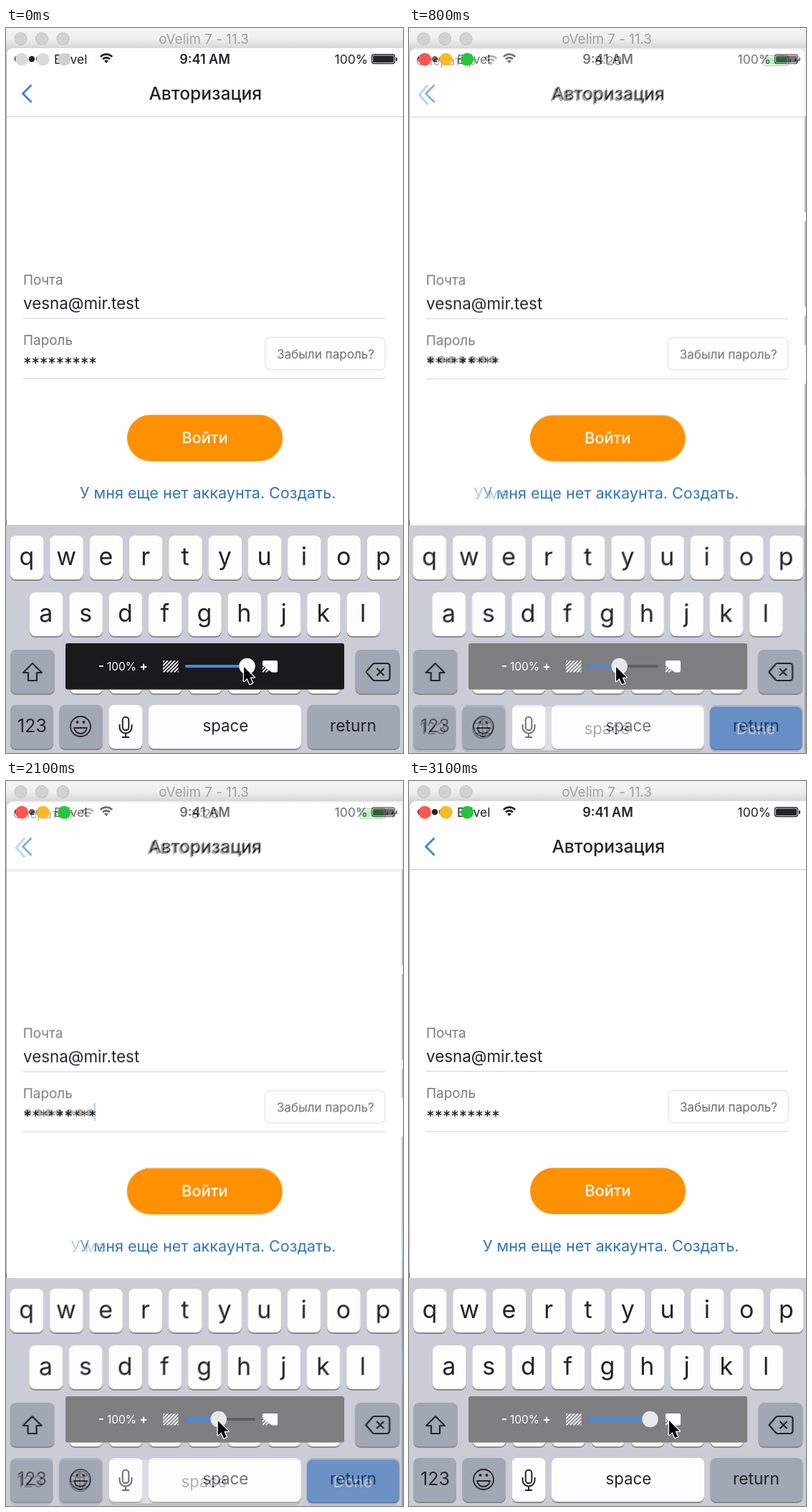
An HTML page with a canvas that plays this animation: 554 by 1011 pixels, repeating every 3200 ms.

```html
<!DOCTYPE html>
<html lang="ru">
<head>
<meta charset="utf-8">
<style>
html, body { margin: 0; width: 100%; height: 100%; overflow: hidden; background: #fff; }
canvas { display: block; width: 554px; height: 1011px; }
</style>
</head>
<body>
<canvas id="stage" width="554" height="1011"></canvas>
<script>
const W = 554, H = 1011, LOOP = 3200, STEP = 100;
const INK = '#232427', KEY = '#fdfdfe', GRAY_KEY = '#a1a7b3', ROW_PITCH = 55.3;
const stage = document.getElementById('stage').getContext('2d');
let g = stage;

function text(str, x, y, size, color = INK, weight = 400, align = 'left') {
  g.font = `${weight} ${size}px Inter, sans-serif`;
  g.textAlign = align;
  g.fillStyle = color;
  g.fillText(str, x, y);
}
function box(x, y, w, h, r, fill, stroke) {
  g.beginPath();
  g.roundRect(x, y, w, h, r);
  if (fill) { g.fillStyle = fill; g.fill(); }
  if (stroke) { g.strokeStyle = stroke; g.lineWidth = 1.3; g.stroke(); }
}
function disc(x, y, r, fill) {
  g.beginPath();
  g.arc(x, y, r, 0, 7);
  g.fillStyle = fill;
  g.fill();
}
function icon(path, x, y, width, stroke = INK, fill) {
  const shape = new Path2D(path);
  g.save();
  g.translate(x, y);
  g.lineWidth = width;
  g.lineJoin = 'round';
  if (fill) { g.fillStyle = fill; g.fill(shape); }
  if (stroke) { g.strokeStyle = stroke; g.stroke(shape); }
  g.restore();
}
function wifi(x, y) {
  icon('M-8.2 -2.4A11.5 11.5 0 0 1 8.2 -2.4M-5 1A7 7 0 0 1 5 1', x, y, 2.6);
  icon('M-2.9 3.4A4 4 0 0 1 2.9 3.4L0 6.5Z', x, y, 0, null, INK);
}
function key(x, y, w, color = KEY, h = 61) {
  box(x, y + 2, w, h, 8, '#888b91');
  box(x, y, w, h, 8, color);
}

// Parts shared by the mock-up and the running app.
function form(dx, dy, link) {
  g.save();
  g.translate(dx, dy);
  text('Почта', 24, 358, 18.9, '#7b7b7f');
  text('Пароль', 24, 442, 18.9, '#7b7b7f');
  box(24, 404, 505, 1.5, 0, '#e0e0e5');
  box(24, 488, 505, 1.5, 0, '#e0e0e5');
  box(361.7, 431.5, 167.5, 45, 7, '#fefefe', '#e7e7ec');
  text('Забыли пароль?', 446, 461, 17.1, '#6d6e72', 400, 'center');
  box(169, 539.5, 217, 64.5, 32.2, '#ff9000');
  text('Войти', 277.5, 579, 21.8, '#fff', 500, 'center');
  g.restore();
  text('vesna@mir.test', 24, 392 + dy * .4, 22.4);
  text(link, 460.5, 656 + dy, 21.6, '#2f73b9', 400, 'right');
}
function keyboard(dx, dy, paintLastRow) {
  g.fillStyle = '#cacdd5';
  g.fillRect(0, 693 + dy, W, H);
  g.save();
  g.translate(dx, 0);
  [['qwertyuiop', 6, 708], ['asdfghjkl', 33, 787], ['zxcvbnm', 88.7, 867]].forEach(([row, x0, y]) =>
    [...row].forEach((letter, i) => {
      const x = x0 + i * ROW_PITCH;
      key(x, y, 46.5);
      text(letter, x + 22.8, y + 41 + dy * .5, 34, INK, 400, 'center');
    }));
  key(6, 867, 62, GRAY_KEY);
  key(487.5, 867, 62, GRAY_KEY);
  icon('M0 -12L13 1H6V12H-6V1H-13Z', 37, 898, 2.2);
  icon('M-16 0L-7 -10.5Q-6 -12 -4 -12H13Q17 -12 17 -8V8Q17 12 13 12H-4Q-6 12 -7 10.5ZM-1 -5L9 5M9 -5L-1 5', 518.5, 898, 2.2);
  const y = 944 + dy * 2;
  key(6, y, 60, GRAY_KEY);
  key(74.5, y, 60.5, GRAY_KEY);
  g.restore();
  paintLastRow(y);
}

function mockup() {
  box(1.5, 28, W, H, [8, 0, 0, 0], '#fefefe');
  [16, 26, 36, 46, 56].forEach(x => disc(x, 43.3, 4.2, INK));
  text('Brivel', 67, 49.5, 17.5);
  wifi(140, 42.5);
  text('9:41 AM', 277.5, 49.5, 18, INK, 600, 'center');
  text('100%', 505, 49.5, 17.5, INK, 400, 'right');
  box(510.5, 37, 32, 12.5, 3, '#fefefe', INK);
  box(512, 38.5, 29, 9.5, 1.5, INK);
  box(544, 41, 2, 5, 1, INK);
  icon('M13 -12L1 0L13 12', 22.5, 91.5, 2.8, '#3985d3');
  text('Авторизация', 278.3, 100, 24.6, INK, 500, 'center');
  box(1, 123, W, 1.2, 0, '#d0d1d4');
  form(0, 0, 'У мня еще нет аккаунта. Создать.');
  for (let i = 0; i < 9; i++)
    icon('M0 -4.5V4.5M-4 -2.3L4 2.3M4 -2.3L-4 2.3', 29.8 + i * 11.4, 463.5, 1.5);
  keyboard(0, 0, y => {
    key(143.5, y, 47);
    key(199, y, 213);
    key(420.5, y, 129, GRAY_KEY);
    text('123', 36.5, 982, 25, INK, 400, 'center');
    icon('M14 0A14 14 0 1 1 -14 0A14 14 0 1 1 14 0ZM-9 2H9Q7 10 0 10T-9 2Z', 104, 974, 1.8);
    disc(99.5, 968, 2, INK);
    disc(108.5, 968, 2, INK);
    icon('M-4.3 -9A4.3 4.3 0 0 1 4.3 -9V1A4.3 4.3 0 0 1 -4.3 1ZM-8.5 -3V1A8.5 8.5 0 0 0 8.5 1V-3M0 9.5V15M-5 15H5', 167, 974, 2);
    text('space', 306.3, 981, 22.2, INK, 400, 'center');
    text('return', 484.5, 981, 22.8, INK, 400, 'center');
  });
}

function app() {
  box(1, 30, 551, H, [8, 8, 0, 0], '#fefefe');
  text('Оператор', 9.5, 52, 17.5);
  wifi(114, 45);
  text('8:20', 278, 52, 17.8, '#000', 500, 'center');
  box(494.5, 38.5, 35, 14, 3.5, '#fefefe', '#77797c');
  box(496.5, 40.5, 31, 10, 2, '#42cf50');
  box(531, 43, 2, 5, 1, '#77797c');
  icon('M2 -7L-4 1H0L-2 7L4 -1H0Z', 541, 45, 0, null, INK);
  icon('M11.5 -13.5L0 0L11.5 13.5', 14.5, 93, 3.4, '#4d95e6');
  text('Авторизация', 276.3, 102, 24.8, INK, 500, 'center');
  box(1, 125, 551, 1.2, 0, '#cfd0d3');
  form(-.7, 1.3, 'У меня еще нет аккаунта. Создать.');
  for (let i = 0; i < 7; i++) disc(30.5 + i * 14.5, 462.5, 5.2, INK);
  keyboard(-1, 1.3, y => {
    key(143.5, y, 267.5);
    key(419.5, y, 129, '#0668e8');
    text('123', 33.5, 985, 23, INK, 400, 'center');
    icon('M14 0A14 14 0 1 1 -14 0A14 14 0 1 1 14 0ZM0 -14V14M-14 0H14M0 -14Q-13 0 0 14Q13 0 0 -14M-10.5 -8Q0 -3 10.5 -8M-10.5 8Q0 3 10.5 8', 103, 976.5, 1.6);
    text('space', 276.3, 985, 22.2, INK, 400, 'center');
    text('Done', 484, 985, 22, '#fff', 400, 'center');
  });
  // Sliver of the desktop beyond the window's right edge.
  box(552, 124, 2, 887, 0, '#55585d');
  [[257, 12], [389, 12], [442, 54]].forEach(([y, h]) => box(552, y, 2, h, 0, '#eee'));
  [[625, 45], [788, 53]].forEach(([y, h]) => box(552, y, 2, h, 0, '#3976c8'));
}

function layer(paint) {
  const canvas = document.createElement('canvas');
  canvas.width = W;
  canvas.height = H;
  g = canvas.getContext('2d');
  paint();
  g = stage;
  return canvas;
}

function titleBar() {
  const shade = g.createLinearGradient(0, 0, 0, 30);
  shade.addColorStop(0, '#f4f4f4');
  shade.addColorStop(.5, '#efefef');
  shade.addColorStop(1, '#d2d2d2');
  g.fillStyle = shade;
  g.fillRect(0, 0, W, 40);
  [20.5, 50, 79.5].forEach(x => {
    disc(x, 15, 9, '#bdbdbd');
    disc(x, 15, 8.2, '#d2d2d2');
  });
  text('oVelim 7 - 11.3', 276, 21.5, 18.8, '#a0a0a0', 400, 'center');
  box(0, 36, 2, 650, 0, '#b3b3b5');
  box(0, 686, 2, 330, 0, '#66686c');
}

function hatch(x, y, w, h) {
  g.save();
  g.beginPath();
  g.rect(x, y, w, h);
  g.clip();
  g.strokeStyle = '#fff';
  g.lineWidth = 1.8;
  g.beginPath();
  for (let i = 2; i < w + h; i += 5) {
    g.moveTo(x + i - h, y + h);
    g.lineTo(x + i, y);
  }
  g.stroke();
  g.restore();
}

function panel(knob, active) {
  box(83, 858, 389, 64.5, 3, active ? '#7f7e81' : '#1a191b');
  text('-', 133, 895, 17, '#fff', 700, 'center');
  text('100%', 161.5, 896, 15.5, '#fff', 400, 'center');
  text('+', 192, 896, 17, '#fff', 700, 'center');
  hatch(219, 882, 21.5, 16.5);
  box(250, 888, 98, 4, 2, active ? '#5f5e61' : '#444');
  box(250, 888, knob - 250, 4, 2, '#3b8bf2');
  disc(knob, 890, 11.2, active ? '#e8e8e9' : '#fff');
  icon('M0 2Q0 0 2 0H19Q21 0 21 2V14.5Q21 16.5 19 16.5H13Z M0 2V7L13 16.5Z', 358, 882, 0, null, '#fff');
  hatch(358, 891, 9, 7.5);
}

// Pointer path: time, x, y.
const POINTER = [[0, 332, 891], [300, 333, 890], [800, 289, 891], [1100, 265, 895], [1400, 245, 896],
  [1800, 244, 896], [2200, 313, 891], [2500, 338, 891], [3000, 363, 892], [LOOP, 363, 892]];
function pointerAt(t) {
  const i = POINTER.findIndex(p => p[0] > t);
  const [t0, x0, y0] = POINTER[i - 1], [t1, x1, y1] = POINTER[i];
  const k = (t - t0) / (t1 - t0);
  return [x0 + (x1 - x0) * k, y0 + (y1 - y0) * k];
}

const mockLayer = layer(mockup), appLayer = layer(app);

function draw(now) {
  const t = Math.floor(now % LOOP / STEP) * STEP;
  const active = t >= 100;
  const [x, y] = pointerAt(t);
  const knob = Math.min(336.5, Math.max(261.5, x + (t < 1800 ? 4.7 : 1)));

  g.fillStyle = '#d8d8d8';
  g.fillRect(0, 0, W, H);
  titleBar();
  g.drawImage(appLayer, 0, 0);
  if ((t + 100) % 1000 < 500) box(122.5, 449, 2.5, 25, 1, '#3d7bea');
  g.globalAlpha = .35 + .65 * (knob - 261.5) / 75;
  g.drawImage(mockLayer, 0, 0);
  g.globalAlpha = 1;

  const lights = active ? ['#fc5650', '#fdb924', '#25c63a'] : ['#dadada', '#dadada', '#d0d0d0'];
  lights.forEach((color, i) => disc(22 + i * 29.6, 43.7, 9, color));
  panel(knob, active);
  const arrow = 'M0 0V20L4.6 15.8L8.2 24L12 22.4L8.5 14.5H14.5Z';
  icon(arrow, x, y, 2.6, '#fff');
  icon(arrow, x, y, 0, null, '#000');
  requestAnimationFrame(draw);
}
requestAnimationFrame(draw);
</script>
</body>
</html>
```
